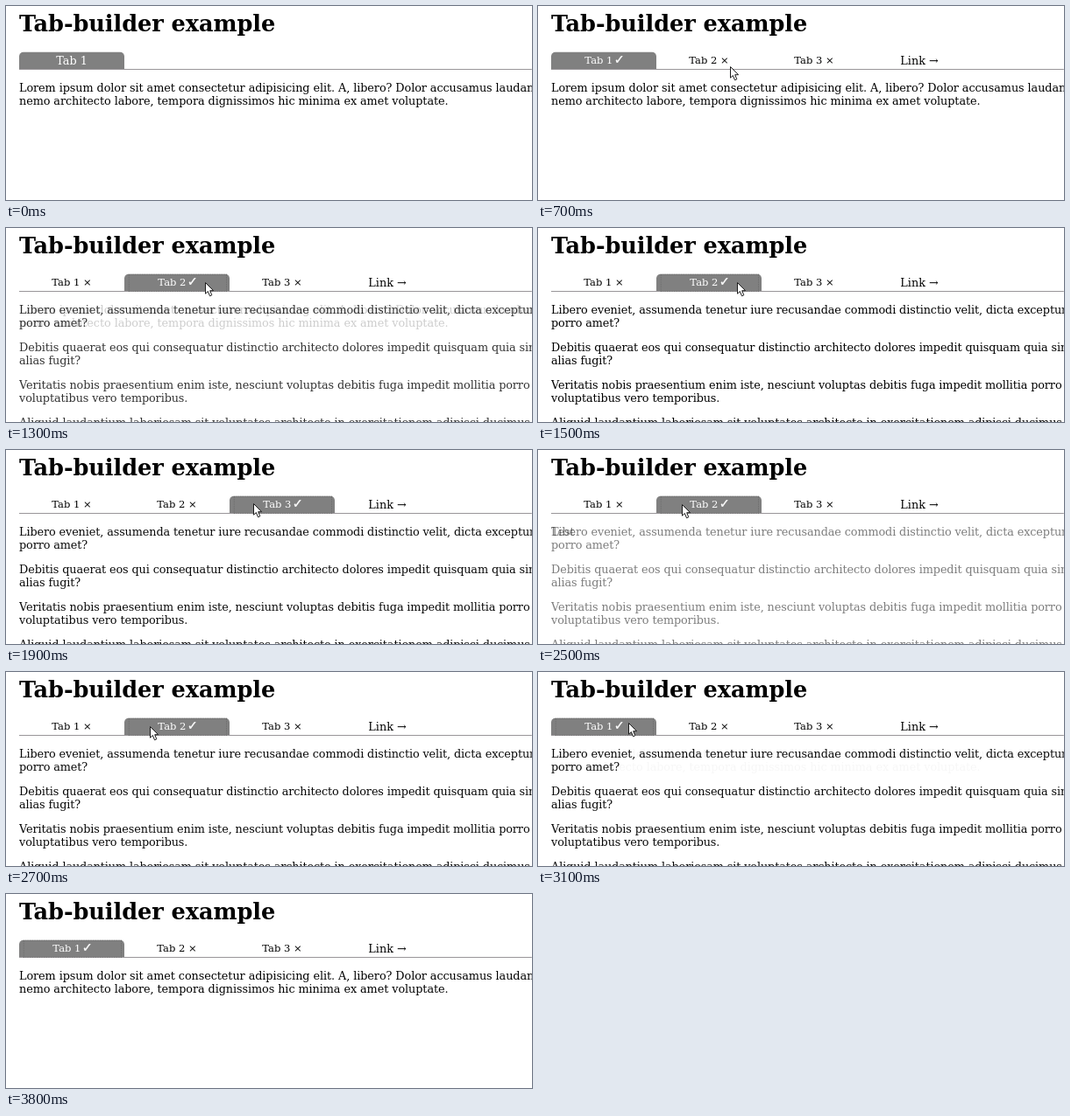
An HTML page that plays this animation: 600x222 px, repeating every 5000 ms.

```html
<!DOCTYPE html>
<html lang="en">
<head>
<meta charset="utf-8">
<title>Tab-builder example</title>
<style>
  html, body { margin: 0; width: 100%; height: 100%; overflow: hidden; background: #fff; }
  /* The page is laid out at full size and shown at 80 %. */
  #page {
    position: absolute; left: 15px; top: 0; width: 731.25px; height: 277.5px; overflow: hidden;
    transform: scale(.8); transform-origin: 0 0;
    font: 16px/19px "DejaVu Serif", "DejaVu Sans", serif; color: #000; white-space: nowrap;
  }
  h1 {
    position: absolute; left: 0; top: 6.25px; margin: 0;
    font-size: 32px; line-height: 38px; letter-spacing: -.08px;
  }
  nav {
    position: absolute; left: 0; top: 65.75px; width: 740px; height: 24.5px;
    display: flex; border-bottom: 1px solid #807c80;
  }
  .tab {
    position: relative; width: 150px; height: 24.5px; line-height: 25px;
    text-align: center; border-radius: 6px 6px 0 0;
  }
  .marked { font-size: 14.4px; }
  .check {
    margin: 0 -2.8px; font: 18px/0 "DejaVu Sans", sans-serif;
    -webkit-text-stroke: .4px;
  }
  .filled { background: #808080; color: #fff; }
  .focused::after {
    content: ""; position: absolute; inset: 0 4px -1px 6px; border: 1px dotted #666;
  }
  .panel { position: absolute; left: 0; top: 107.25px; letter-spacing: -.09px; }
  .panel.long { letter-spacing: -.13px; }
  .panel p { margin: 0 0 16px; }
  #cursor { position: absolute; left: 0; top: 0; overflow: visible; }
</style>
</head>
<body>
<div id="page">
  <h1>Tab-builder example</h1>
  <nav>
    <div class="tab"></div>
    <div class="tab"></div>
    <div class="tab"></div>
    <div class="tab"></div>
  </nav>
  <div class="panel">
    <p>Lorem ipsum dolor sit amet consectetur adipisicing elit. A, libero? Dolor accusamus laudantium<br>nemo architecto labore, tempora dignissimos hic minima ex amet voluptate.</p>
  </div>
  <div class="panel long">
    <p>Libero eveniet, assumenda tenetur iure recusandae commodi distinctio velit, dicta excepturi<br>porro amet?</p>
    <p>Debitis quaerat eos qui consequatur distinctio architecto dolores impedit quisquam quia sint<br>alias fugit?</p>
    <p>Veritatis nobis praesentium enim iste, nesciunt voluptas debitis fuga impedit mollitia porro<br>voluptatibus vero temporibus.</p>
    <p>Aliquid laudantium laboriosam sit voluptates architecto in exercitationem adipisci ducimus</p>
  </div>
  <div class="panel"><p>Test</p></div>
</div>
<svg id="cursor" width="12" height="18">
  <path d="M.5 .5V13.2L3.4 10.5L5.5 15.8L7.8 14.8L5.7 9.7H9.6Z" fill="#fff" stroke="#1c1c1c" stroke-linejoin="round"/>
</svg>
<script>
const LOOP = 5000, STEP = 100, FADE = 400;
const tabs = [...document.querySelectorAll(".tab")];
const panels = [...document.querySelectorAll(".panel")];
const cursor = document.getElementById("cursor");

// Each track lists [time, value]; a value holds until the next entry.
const pointer = [
  [0, null], [700, [219, 69]], [800, [310, 76]], [900, [227, 62]],
  [1800, [268, 62]], [1900, [282, 61]], [2400, [190, 63]], [2500, [164, 62]],
  [3000, [118, 61]], [3100, [103, 58]], [3700, [84, 57]], [3800, null]
];
const hover = [[0, -1], [900, 1], [1800, 2], [2400, 1], [3000, 0], [3800, -1]];
const focus = [[0, -1], [1100, 1], [1900, 2], [2500, 1], [3100, 0]];
const selection = [
  [0, { tab: 0, from: 0, fadeStart: -FADE }],
  [1300, { tab: 1, from: 0, fadeStart: 1100 }],
  [1900, { tab: 2, from: 1, fadeStart: 1880 }],
  [2500, { tab: 1, from: 2, fadeStart: 2380 }],
  [3100, { tab: 0, from: 1, fadeStart: 3080 }]
];
const valueAt = (track, t) => track.findLast(([start]) => start <= t)[1];

// Standard CSS "ease" curve.
const bezier = (s, a, b) => 3 * s * (1 - s) ** 2 * a + 3 * s * s * (1 - s) * b + s ** 3;
function ease(p) {
  let low = 0, high = 1;
  for (let i = 0; i < 20; i++) {
    const mid = (low + high) / 2;
    if (bezier(mid, .25, .25) < p) low = mid; else high = mid;
  }
  return bezier(high, .1, 1);
}

function label(i, selected, t) {
  if (t < 200 && i > 0) return "";
  const name = i < 3 ? "Tab " + (i + 1) : "Link";
  if (t < 300) return name;
  const mark = i === 3 ? "→" : i === selected ? '<span class="check">✓</span>' : "×";
  return name + " " + mark;
}

function render(t) {
  const { tab, from, fadeStart } = valueAt(selection, t);
  const hovered = valueAt(hover, t), focused = valueAt(focus, t);
  tabs.forEach((el, i) => {
    el.innerHTML = label(i, tab, t);
    el.classList.toggle("marked", t >= 300 && i < 3);
    el.classList.toggle("filled", i === tab || i === hovered);
    el.classList.toggle("focused", i === focused);
  });

  const shown = ease(Math.min(1, (t - fadeStart) / FADE));
  panels.forEach((el, i) => {
    el.style.opacity = i === tab ? shown : i === from ? 1 - shown : 0;
  });

  const tip = valueAt(pointer, t);
  cursor.style.display = tip ? "block" : "none";
  if (tip) cursor.style.transform = `translate(${tip[0]}px, ${tip[1]}px)`;
}

const begin = performance.now();
function tick() {
  const t = (performance.now() - begin) % LOOP;
  render(Math.floor(t / STEP) * STEP);
  requestAnimationFrame(tick);
}
tick();
</script>
</body>
</html>
```
